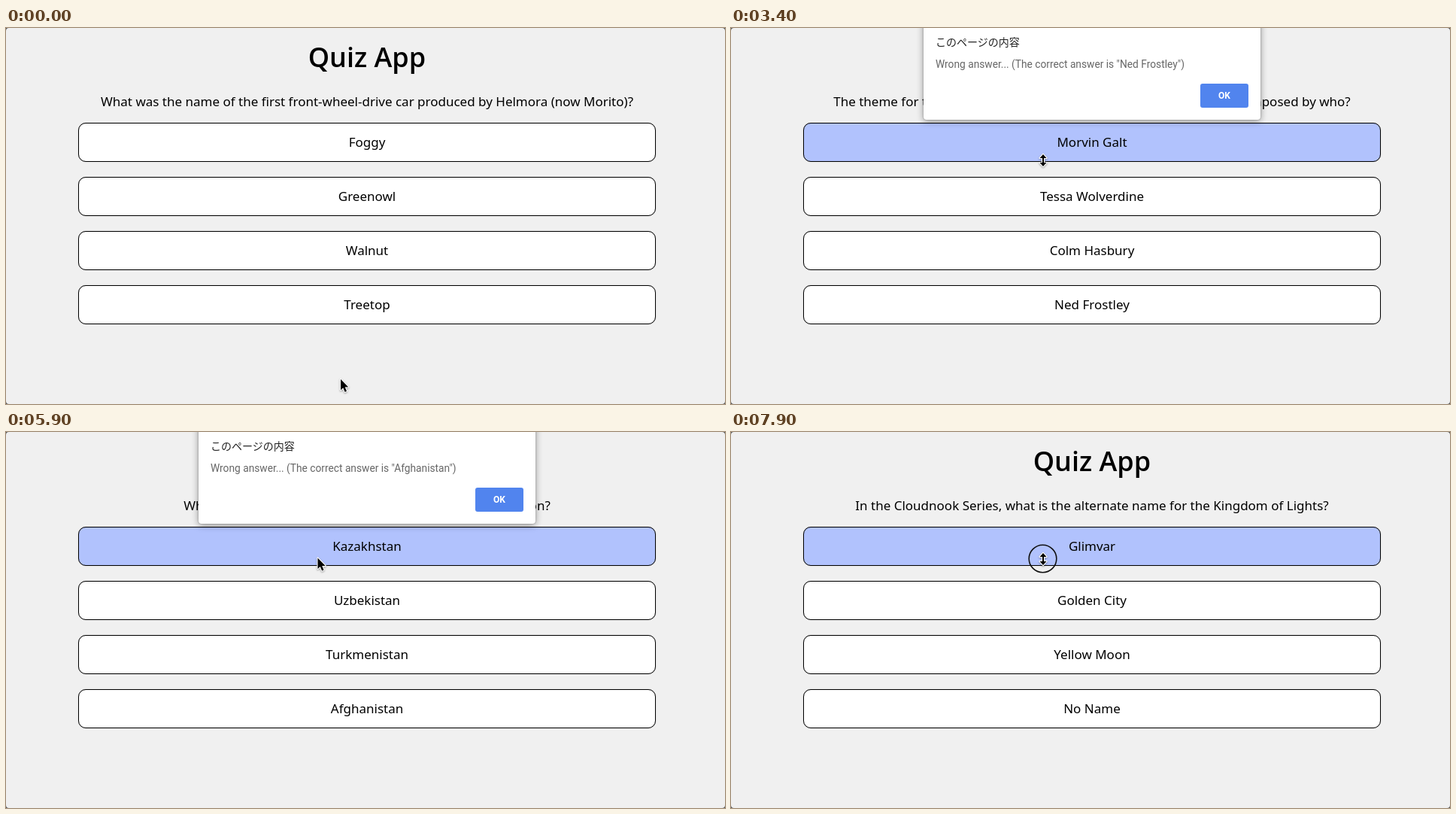
Recreate the animation shown at these times as an HTML page. Size 956x500 px, loop 8000 ms.

```html
<!DOCTYPE html>
<html lang="en">
<head>
<meta charset="utf-8">
<title>Quiz App</title>
<style>
  html, body { margin: 0; width: 100%; height: 100%; overflow: hidden; background: #555; }
  #stage {
    position: relative; width: 956px; height: 500px; overflow: hidden;
    border-radius: 4px; background: #f0f0f0; color: #000;
    font: 17px/24px "Noto Sans", "Open Sans", sans-serif;
  }
  #app { width: 960px; text-align: center; }
  h1, #question { position: absolute; width: 960px; margin: 0; white-space: nowrap; }
  h1 { top: 14px; font: 600 36px/50px "Open Sans", "Noto Sans", sans-serif; }
  #question { top: 86px; }
  .option {
    position: absolute; left: 96px; width: 768px; height: 52px; box-sizing: border-box;
    border: 1px solid #000; border-radius: 10px; background: #fff; line-height: 50px;
    box-shadow: 0 0 1px rgba(0, 0, 0, .4);
  }
  .option.hover { background: #b1c2fd; }
  #dialog {
    position: absolute; left: 256px; top: -20px; width: 448px; height: 142px;
    border-radius: 4px; background: #fff; transform-origin: 50% 100%;
    box-shadow: 0 2px 10px rgba(0, 0, 0, .4), 0 0 2px rgba(0, 0, 0, .3);
    font: 13.75px/20px Roboto, sans-serif; color: #666; white-space: nowrap;
  }
  #dialog.tall { height: 162px; }
  #dialog div { position: absolute; left: 16px; }
  #heading { top: 28px; font: 14px/20px "Noto Sans CJK JP", "Noto Sans CJK", sans-serif; color: #222; }
  #message { top: 58px; }
  #dialog #ok {
    left: auto; right: 16px; bottom: 16px; width: 64px; height: 32px; border-radius: 3px;
    background: #5184ee; color: #fff; text-align: center; font: bold 12px/32px Roboto, sans-serif;
  }
  svg { position: absolute; left: 0; top: 0; }
  #pointer path {
    fill: #000; stroke: #fff; stroke-width: 2.2; stroke-linejoin: round; paint-order: stroke;
    filter: drop-shadow(0 1px 1px rgba(0, 0, 0, .35));
  }
</style>
</head>
<body>
<div id="stage">
  <div id="app">
    <h1>Quiz App</h1>
    <div id="question"></div>
    <div id="options"></div>
  </div>
  <div id="dialog">
    <div id="heading" lang="ja">このページの内容</div>
    <div id="message"></div>
    <div id="ok">OK</div>
  </div>
  <svg width="956" height="500">
    <circle id="ring" cx="414.5" cy="168.5" r="18.3" fill="none" stroke="#111" stroke-width="1.6"/>
    <g id="pointer"><path/></g>
  </svg>
</div>
<script>
const STEP = 100, LOOP = 8000;
const ARROW = "M0 0V14.5L3.3 11.5 5.6 17 8 16 5.7 10.6H10.2Z";
const RESIZE = "M0-8 4.5-3H1V3H4.5L0 8-4.5 3H-1V-3H-4.5Z";

// start, click, show and hide are counted in steps
const rounds = [
  { start: 0,
    question: "What was the name of the first front-wheel-drive car produced by Helmora (now Morito)?",
    options: ["Foggy", "Greenowl", "Walnut", "Treetop"] },
  { start: 17, question: "", options: [] },
  { start: 22, click: 28, show: 30, hide: 35, answer: 3,
    question: 'The theme for the popular science fiction series "Warden Orb" was composed by who?',
    options: ["Morvin Galt", "Tessa Wolverdine", "Colm Hasbury", "Ned Frostley"] },
  { start: 36, click: 46, show: 48, hide: 51, answer: 1, tall: true,
    question: 'What is the name of the assassin in the first "Grimkid" movie?',
    options: ["Ulrich Dieter von Brask", "Hans Albrecht Vorlmen", "Dmitri Ostapovich Belunkin", "Edda Kornfeldt"] },
  { start: 52, click: 54, show: 56, hide: 60, answer: 3,
    question: "Which of these countries was NOT a part of the Soviet Union?",
    options: ["Kazakhstan", "Uzbekistan", "Turkmenistan", "Afghanistan"] },
  { start: 61, click: 62, show: 64, hide: 67, answer: 1, tall: true,
    question: "What prompted the addition of the crown to Liechtenstein's flag?",
    options: ["Coronation of Prince Albrik V Konrad in 1805", "The 1934 Regattas",
      "Signing of the 1862 Constitution of Liechtenstein", "Godwick IV's decree in 1719"] },
  { start: 68, click: 71, show: 73, hide: 75, answer: 1, tall: true,
    question: 'In Tale of Duskvale lore, who was first to have the title "The Stormcaller"?',
    options: ["Jorin Feldrick", "Bartholeus Venngard", "Corvin Delathor", "Osric the Stormkeeper"] },
  { start: 76, click: 79,
    question: "In the Cloudnook Series, what is the alternate name for the Kingdom of Lights?",
    options: ["Glimvar", "Golden City", "Yellow Moon", "No Name"] }
];

const $ = id => document.getElementById(id);
const boxes = [0, 1, 2, 3].map(i => {
  const box = document.createElement("div");
  box.className = "option";
  box.style.top = 126 + 72 * i + "px";
  return $("options").appendChild(box);
});

const mix = (a, b, u) => a.map((v, i) => v + (b[i] - v) * u);

function pointerAt(step) {
  if (step < 1) return [445, 467];
  if (step < 2) return [653, 36];
  if (step < 8) return [170, 85];
  if (step < 12) return mix([170, 85], [28, 12], (step - 7) / 4);
  if (step < 21) return null;
  if (step < 26) return mix([67, 47], [415, 176], 1 - (1 - (step - 21) / 5) ** 2);
  return step < 46 ? [415, 176] : [415, 169];
}

function dialogAlpha(step, { show, hide }) {
  if (show === undefined || step < show || step > hide) return 0;
  if (step === hide) return 0.2;
  return step === show ? 0.6 : 1;
}

function drawDialog(round, alpha) {
  const dialog = $("dialog"), tilt = (1 - alpha) / 0.8;
  dialog.style.display = alpha ? "block" : "none";
  if (!alpha) return;
  dialog.className = round.tall ? "tall" : "";
  dialog.style.opacity = alpha;
  dialog.style.transform = tilt
    ? `perspective(1000px) translateY(${-16 * tilt}px) rotateX(${20 * tilt}deg) scaleY(${1 + 0.13 * tilt})`
    : "none";
  $("message").textContent = `Wrong answer... (The correct answer is "${round.options[round.answer]}")`;
}

function drawPointer(step, pos, hover, alpha) {
  const pointer = $("pointer");
  pointer.style.display = pos ? "" : "none";
  if (!pos) return;
  const arrow = !hover || (alpha > 0 && step > 47);
  const [x, y] = arrow && hover ? [pos[0] - 0.5, pos[1] - 1.5] : pos;
  pointer.setAttribute("transform", `translate(${x} ${y})`);
  pointer.firstChild.setAttribute("d", arrow ? ARROW : RESIZE);
}

function draw(step) {
  const round = rounds.findLast(r => r.start <= step);
  const pos = pointerAt(step);
  const hover = step > 21 && pos[0] > 96 && pos[1] > 126;
  const alpha = dialogAlpha(step, round);

  $("question").textContent = round.question;
  boxes.forEach((box, i) => {
    box.style.display = round.options.length ? "" : "none";
    box.textContent = round.options[i] || "";
    box.classList.toggle("hover", hover && i === 0);
  });
  drawDialog(round, alpha);
  drawPointer(step, pos, hover, alpha);
  $("ring").style.display = step === round.click ? "" : "none";
  $("ring").setAttribute("cy", pos ? pos[1] - 0.5 : 0);
}

const begin = performance.now();
let shown = -1;
function tick() {
  const step = Math.floor(((performance.now() - begin) % LOOP) / STEP);
  if (step !== shown) draw(shown = step);
  requestAnimationFrame(tick);
}
tick();
</script>
</body>
</html>
```
